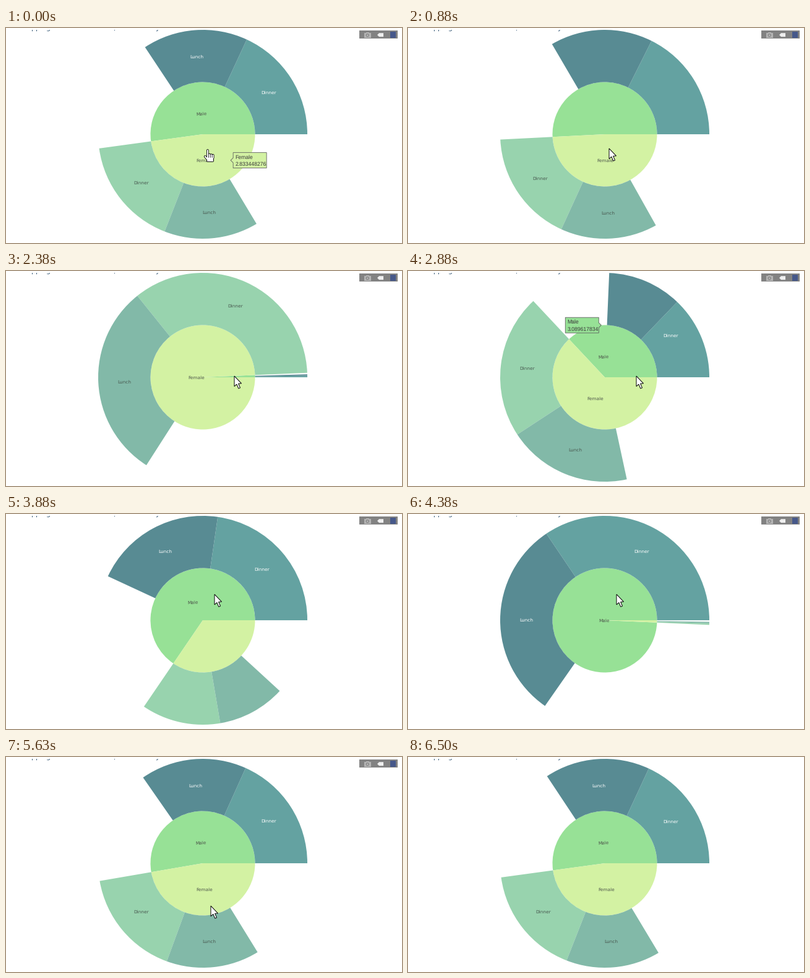
Write a matplotlib script that moves like this. It is 640 px wide and 348 px high and loops after 6.62 s.

```python
import numpy as np
import matplotlib as mpl
import matplotlib.pyplot as plt
from matplotlib.animation import FuncAnimation
from matplotlib.patches import Circle, Polygon, Rectangle, Wedge

W, H, DPI = 640, 348, 100
LOOP, INTERVAL, STEP = 6620, 20, 125
CX, CY, R1, R2 = 318, 172, 84.5, 169
PT = 72 / DPI

mpl.rcParams["text.hinting"] = "none"

# group, mean, fill, label radius, then meals: name, mean, fill, text colour
DATA = [
    ("Male", 3.089617834, "#97e196", 34,
     [("Dinner", 3.214516, "#64a2a1", "white"),
      ("Lunch", 2.882121, "#588b93", "white")]),
    ("Female", 2.833448276, "#d3f2a3", 42.2,
     [("Dinner", 3.002115, "#98d3ae", "#48584f"),
      ("Lunch", 2.582857, "#82b9a8", "#48584f")]),
]
DEG = 360 / sum(group[1] for group in DATA)

# zoomed group, start ms, length ms, zooming in
ZOOMS = [
    ("Female", 660, 1152, True),
    ("Female", 2204, 1152, False),
    ("Male", 3401, 1152, True),
    ("Male", 4810, 950, False),
]
# first step, last step, group, radius of the circle beside which the box sits
HOVERS = [
    (-1, 4, "Female", R1 / 2),
    (15, 18, "Female", R1),
    (23, 27, "Male", 0),
    (36, 39, "Male", R1),
]
# step, x, y
CURSOR = np.array([(4, 325, 195), (12, 325, 195), (16, 369, 170),
                   (23, 369, 170), (26, 337, 130), (36, 337, 130),
                   (38, 332, 138), (43, 332, 138), (47, 330, 344)])
LEAVE = 48

fig = plt.figure(figsize=(W / DPI, H / DPI), dpi=DPI, facecolor="white")
ax = fig.add_axes([0, 0, 1, 1])
ax.set_xlim(0, W)
ax.set_ylim(H, 0)
ax.axis("off")


def add_text(x, y, s, px, color, z, family="DejaVu Sans", ha="left"):
    return ax.text(x, y, s, fontsize=px * PT, color=color, family=family,
                   ha=ha, va="baseline", rotation_mode="anchor", zorder=z)


def add_shape(shape, z):
    shape.set_zorder(z)
    return ax.add_patch(shape)


def polar(angle, r):
    a = np.radians(angle)
    return CX + r * np.cos(a), CY - r * np.sin(a)


class Sector:
    def __init__(self, group, name, span, fill, ink, label_r):
        self.group, self.name, self.span = group, name, span
        self.fill, self.label_r = fill, label_r
        radius, width = (R1, None) if group == name else (R2, R2 - R1)
        self.wedge = add_shape(Wedge((CX, CY), radius, 0, 90, width=width,
                                     fc=fill, lw=0), 1)
        self.label = add_text(CX, CY, name, 7.4, ink, 3, ha="center")


sectors, groups = [], {}
start = 0
for group, mean, fill, label_r, meals in DATA:
    end = start + mean * DEG
    groups[group] = Sector(group, group, (start, end), fill, "#4c554a",
                           label_r)
    groups[group].mean = mean
    sectors.append(groups[group])
    a = start
    for meal, value, color, ink in meals:
        b = a + value * DEG / 3
        sectors.append(Sector(group, meal, (a, b), color, ink,
                              (R1 + R2) / 2))
        a = b
    start = end

# bottom edge of a heading that is scrolled out of view
for x, s in [(40.5, "pping"), (173, ","), (242, "y")]:
    add_text(x, 2.8, s, 11, "#2a4f6f", 3)
add_shape(Rectangle((0, 0), W, 2.7, fc="white", lw=0), 4)

# toolbar
GREY, PALE = "#828282", "#b4b4b4"
toolbar = [
    add_shape(Rectangle((571, 3.7), 62.3, 13.8, fc=GREY, lw=0), 5),
    add_shape(Rectangle((579, 8), 10.5, 7.5, fc=PALE, lw=0), 6),
    add_shape(Rectangle((582, 6.5), 4.5, 2, fc=PALE, lw=0), 6),
    add_shape(Circle((584.2, 11.7), 2.7, fc=GREY, lw=0), 7),
    add_shape(Circle((584.2, 11.7), 1.5, fc=PALE, lw=0), 8),
    add_shape(Polygon([(600, 11.2), (603, 8.2), (610, 8.2), (610, 14.2),
                       (603, 14.2)], fc="#efefef", lw=0), 6),
    add_shape(Rectangle((620.5, 6), 9.5, 10, fc="#46588a", lw=0), 6),
]

# hover box, with its tip at the origin
BOX = np.array([(0, 0), (4, 4), (4, 12.5), (58, 12.5), (58, -12.5),
                (4, -12.5), (4, -4)])
tip_box = add_shape(Polygon(BOX, ec="#5c5c5c", lw=0.6), 8)
tip_name = add_text(0, 0, "", 8.6, "#3a3a3a", 9, "Liberation Sans")
tip_value = add_text(0, 0, "", 8.6, "#3a3a3a", 9, "Liberation Sans")

ARROW = np.array([(0, 0), (0, 16.8), (3.8, 13.3), (6.8, 20.2), (9.5, 19),
                  (6.6, 12.3), (11.5, 12)])
arrow = add_shape(Polygon(ARROW, fc="white", ec="black", lw=0.7), 10)


def hand_strokes():
    """Round strokes for the fingers, the thumb and the palm."""
    strokes = [[(0.9, 3), (0.9, 15)], [(-3.2, 13), (1, 18)]]
    strokes += [[(0.9 + 2.9 * i, 9 + 0.6 * i), (0.9 + 2.9 * i, 15)]
                for i in range(1, 4)]
    strokes += [[(0.9, y), (9.2, y)] for y in (16, 18, 20)]
    gap = [(np.nan, np.nan)]
    return np.array([p for s in strokes for p in s + gap])


HAND = hand_strokes()
hand = [ax.plot([], [], color=color, lw=px * PT, zorder=z,
                solid_capstyle="round")[0]
        for color, px, z in [("black", 3.8, 10), ("white", 2.1, 11)]]


def ease(u):
    u = min(max(u, 0), 1)
    return 4 * u**3 if u < 0.5 else 1 - 4 * (1 - u)**3


def zoom_state(t):
    """Zoomed group, zoom amount, label radius factor, scale of the rest."""
    begun = [z for z in ZOOMS if z[1] <= t]
    if not begun:
        return "Female", 0, 1, 1
    name, t0, length, inward = begun[-1]
    p = ease((t - t0) / length)
    if inward:
        return name, p, 1 - p**3, 0
    return name, 1 - p, p**(1 / 3), min(1, 3 * p)


def draw_sectors(t):
    target, amount, pull, rest = zoom_state(t)
    lo, hi = groups[target].span
    for s in sectors:
        base = np.array(s.span)
        full = 360 * np.clip((base - lo) / (hi - lo), 0, 1)
        a, b = base + amount * (full - base)
        s.wedge.set_theta1(-b)
        s.wedge.set_theta2(-a)
        s.wedge.set_visible(b - a > 0.02)

        kept = s.group == target
        scale = 1 if kept else rest
        r = s.label_r * (pull if s.name == target else 1)
        x, y = polar((a + b) / 2 if kept else base.mean(), r)
        s.label.set_visible(scale > 0.08)
        s.label.set_fontsize(max(7.4 * scale, 0.5) * PT)
        s.label.set_position((x, y + 2.8 * scale))
        if s.name == "Male":
            s.label.set_rotation((base.mean() - 90)
                                 * (1 - amount if kept else 1))


def draw_hover(hover):
    for part in (tip_box, tip_name, tip_value):
        part.set_visible(hover is not None)
    if hover is None:
        return
    group, radius = groups[hover[2]], hover[3]
    x, y = polar(np.mean(group.span), R1 - radius)
    x += radius
    side = 1 if radius else -1
    tip_box.set_xy(BOX * (side, 1) + (x, y))
    tip_box.set_facecolor(group.fill)
    left = x + 7 if side > 0 else x - 55
    tip_name.set_text(group.name)
    tip_name.set_position((left, y - 2.7))
    tip_value.set_text(f"{group.mean:.9f}")
    tip_value.set_position((left, y + 8.8))


def draw_cursor(k, pointing):
    inside = k < LEAVE
    x, y = (np.interp(k, CURSOR[:, 0], CURSOR[:, c]) for c in (1, 2))
    arrow.set_visible(inside and not pointing)
    arrow.set_xy(ARROW + (x, y))
    for line in hand:
        line.set_visible(inside and pointing)
        line.set_data(*(HAND + (x, y)).T)
    for part in toolbar:
        part.set_visible(inside)


def update(i):
    k = (i * INTERVAL + INTERVAL // 2) // STEP
    hover = next((h for h in HOVERS if h[0] <= k <= h[1]), None)
    draw_sectors(k * STEP)
    draw_hover(hover)
    draw_cursor(k, hover is not None and k > hover[0])
    return []


anim = FuncAnimation(fig, update, frames=LOOP // INTERVAL, interval=INTERVAL,
                     repeat=True, repeat_delay=0)
plt.show()
```
